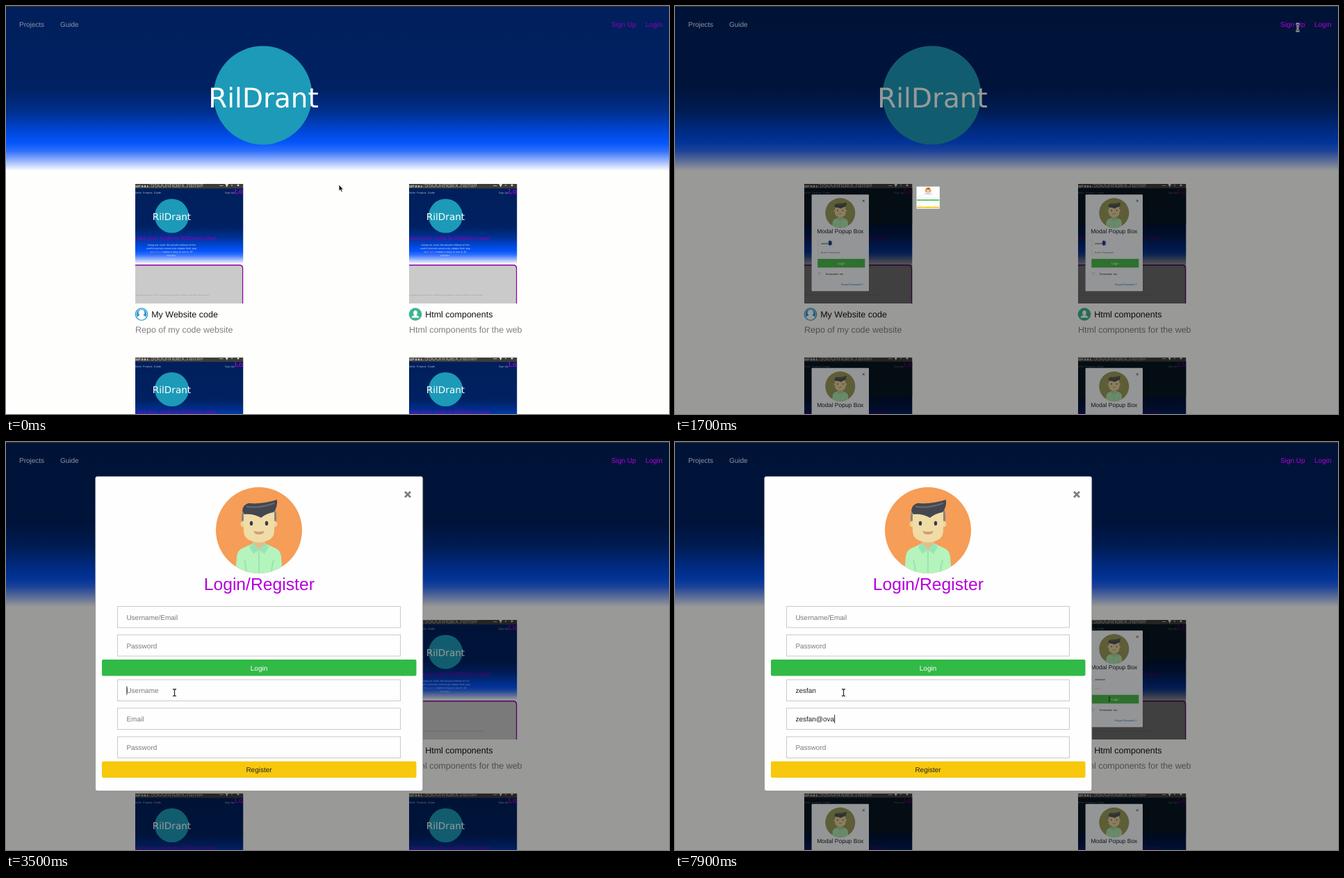
Write an HTML page that moves like this. It is 954 px wide and 587 px high and loops after 8 s.

```html
<!DOCTYPE html>
<html lang="en">
<head>
<meta charset="utf-8">
<title>Sign up form</title>
<style>
html, body { margin: 0; width: 100%; height: 100%; overflow: hidden; background: #fefefc; }
svg { display: block; width: 954px; height: 587px; }
text { font-family: "Liberation Sans", Arial, sans-serif; font-size: 10px; text-rendering: geometricPrecision; white-space: pre; }
.brand { font-family: "DejaVu Sans", sans-serif; fill: #fff; }
.mid { text-anchor: middle; }
.tiny { font-size: 3.8px; }
.title { font-size: 12.5px; fill: #111; }
.sub { font-size: 12.5px; fill: #808080; }
.field { fill: #fefefe; stroke: #c9c9c9; }
</style>
</head>
<body>
<svg viewBox="0 0 954 587" xmlns="http://www.w3.org/2000/svg">
  <defs>
    <linearGradient id="sky" x1="0" y1="0" x2="0" y2="1">
      <stop offset="0" stop-color="#001f5b"/>
      <stop offset=".5" stop-color="#002162"/>
      <stop offset=".64" stop-color="#002f8c"/>
      <stop offset=".76" stop-color="#0047d8"/>
      <stop offset=".83" stop-color="#0455fb"/>
      <stop offset=".88" stop-color="#2f70fb"/>
      <stop offset=".94" stop-color="#96b4fc"/>
      <stop offset="1" stop-color="#fefefc"/>
    </linearGradient>
    <clipPath id="round"><circle r="62"/></clipPath>
    <clipPath id="pane"><rect width="155.5" height="172"/></clipPath>

    <g id="man" clip-path="url(#round)">
      <path d="M-9 12H9V34H-9Z" fill="#e3bd8c"/>
      <path d="M-34 64L-32 38Q-31 28-22 25L-9 19L0 29L9 19L22 25Q31 28 32 38L34 64Z" fill="#b5f4bc"/>
      <path d="M-9 18L-14 24L-8 34L0 28L8 34L14 24L9 18L0 28Z" fill="#98e4b4"/>
      <path d="M0 29V64M-21 43Q-18 52-18 64M21 43Q18 52 18 64" fill="none" stroke="#98e4b4" stroke-width="2"/>
      <path d="M-25-13Q-26-28-19-32H22Q26-28 25-13Z" fill="#8b817b"/>
      <circle cx="-22" cy="-9" r="4.5" fill="#ecd39a"/>
      <circle cx="22" cy="-9" r="4.5" fill="#ecd39a"/>
      <path d="M-22-27H22V2Q21 12 12 15Q0 20-12 15Q-21 12-22 2Z" fill="#f0dca6"/>
      <path d="M-24-28Q-23-37-15-39Q4-37 26-44Q27-33 21-26Q10-24 3-18Q-8-24-21-23Z" fill="#44474f"/>
      <path d="M-18-34Q0-31 22-39" fill="none" stroke="#666a72" stroke-width="2"/>
      <ellipse cx="-11" cy="-10" rx="2.2" ry="3.2" fill="#3a3c44"/>
      <ellipse cx="11" cy="-10" rx="2.2" ry="3.2" fill="#3a3c44"/>
      <path d="M-7.5 1Q0 3 7.5 1Q7 6 0 6Q-7 6-7.5 1Z" fill="#d39b7a"/>
    </g>

    <g id="thumb" clip-path="url(#pane)">
      <rect width="155.5" height="172" fill="#fefefc"/>
      <rect y="6" width="155.5" height="109" fill="url(#sky)"/>
      <rect id="tint" y="6" width="155.5" height="51" fill="#122c30" opacity=".75"/>
      <rect width="155.5" height="6.5" fill="#3d3c39"/>
      <text y="4.8" font-size="5" fill="#aaa"><tspan font-weight="bold" font-size="4.6" fill="#fff">127.0.0.1</tspan>:5500/index.html#</text>
      <text x="121" y="4.6" font-size="5" fill="#ddd">– ▾ ◦  ▪  ×</text>
      <text y="14" class="tiny" fill="#aab4cc">Write  Projects  Guide</text>
      <text x="129" y="14" class="tiny" fill="#aab4cc">Sign Up</text>
      <text x="143" y="13.5" font-size="4" font-weight="bold" fill="#a000c8">Login</text>
      <circle cx="52.5" cy="46" r="24.5" fill="#1c9ab8"/>
      <text x="52.5" y="51.5" class="brand mid" style="font-size:13.6px">RilDrant</text>
      <text y="81" style="font-size:8.5px" fill="#8d00b4">oad your code to RilDrant now!</text>
      <g id="blurb" class="mid" fill="#c3d0ee"></g>
      <path d="M-3 116.8H149.5Q154.7 116.8 154.7 122V176H-3Z" fill="#cacaca" stroke="#8d00a8" stroke-width="1.5"/>
      <text y="160.5" style="font-size:3.4px" fill="#a2a2a2">ing and keep all of the code that you wish to share with the others here</text>
      <rect id="dim" y="6" width="155.5" height="166" opacity=".47"/>
      <g id="popup">
        <rect x="-41.2" y="-69.5" width="82.4" height="139" rx="1" fill="#f5f8fa"/>
        <g transform="translate(0 -43) scale(.347)">
          <circle r="62" fill="#9b9a5b"/>
          <use href="#man" opacity=".85"/>
        </g>
        <path d="M32-62l3 3m0-3l-3 3" stroke="#444" stroke-width=".9"/>
        <text y="-13.5" class="mid" style="font-size:8.5px" fill="#222">Modal Popup Box</text>
        <path d="M-32-5V5M-32 9V19" stroke="#ccd" stroke-width=".6"/>
        <text x="-28" y="2" class="tiny" fill="#333">unknown</text>
        <rect id="mark" x="-17" y="-2.5" width="5" height="5.5" fill="#2453b8"/>
        <text id="pass" x="-28" y="15.5" class="tiny" fill="#777"></text>
        <rect x="-32.5" y="23" width="68" height="12.5" fill="#4dbb4b"/>
        <text x="1.5" y="31" class="mid" style="font-size:4.6px" fill="#fff">Login</text>
        <rect x="-31" y="43" width="2.5" height="2.5" fill="#fff" stroke="#999" stroke-width=".4"/>
        <text x="-21" y="46" class="tiny" fill="#333">Remember me</text>
        <text x="1" y="61.5" class="tiny" fill="#2a6fd0">Forgot Password ?</text>
      </g>
      <path id="dot" d="M-1-3H1M0-3V3M-1 3H1" stroke="#222" stroke-width=".9"/>
    </g>
  </defs>

  <rect width="954" height="587" fill="#fefefc"/>
  <rect width="954" height="237" fill="url(#sky)"/>
  <circle cx="369.5" cy="128.5" r="71" fill="#1c9ab8"/>
  <text x="370.5" y="145.5" class="brand mid" style="font-size:39px">RilDrant</text>

  <use href="#thumb" x="186" y="256"/>
  <use href="#thumb" x="580" y="256"/>
  <use href="#thumb" x="186" y="505.5"/>
  <use href="#thumb" x="580" y="505.5"/>
  <g transform="translate(195 443.5)">
    <circle r="9.3" fill="#2797cb"/>
    <path d="M-6.4 4.6Q-5 1.6-2.4 1.4H2.4Q5 1.6 6.4 4.6A7.9 7.9 0 0 1-6.4 4.6Z" fill="#fff"/>
    <circle cy="-2.3" r="4.3" fill="#fff"/>
    <circle r="7.6" fill="none" stroke="#fff" stroke-width=".8"/>
  </g>
  <g transform="translate(589 443.5)">
    <circle r="9.3" fill="#3bb68f"/>
    <path d="M-5.6 5Q-5.4 2.4-1.5 1.4H1.5Q5.4 2.4 5.6 5Z" fill="#fff"/>
    <ellipse cy="-2" rx="2.8" ry="3.5" fill="#fff"/>
  </g>
  <text x="209.2" y="448" class="title">My Website code</text>
  <text x="186" y="469.5" class="sub">Repo of my code website</text>
  <text x="603.2" y="448" class="title">Html components</text>
  <text x="580" y="469.5" class="sub">Html components for the web</text>

  <rect id="shade" width="954" height="587" opacity=".4"/>
  <rect width="954" height="1.2" fill="#33332f"/>
  <g fill="#8b93a6">
    <text x="19" y="30">Projects</text>
    <text x="78" y="30">Guide</text>
  </g>
  <g id="links">
    <text x="871" y="30">Sign Up</text>
    <text x="920" y="30">Login</text>
  </g>

  <g id="modal">
    <rect x="128.5" y="49.5" width="471.3" height="452.5" rx="3" fill="#fefefe" stroke="#777" stroke-width=".6"/>
    <path d="M574 71.5l8 8m0-8l-8 8" stroke="#7d7d7d" stroke-width="2.8"/>
    <g transform="translate(364 127)">
      <circle r="62" fill="#f69d57"/>
      <use href="#man"/>
    </g>
    <text x="364.3" y="212.5" class="mid" style="font-size:24.7px" fill="#b400dc">Login/Register</text>
    <g id="fields"></g>
    <rect x="138" y="313" width="452.5" height="23.5" rx="2" fill="#31ba45"/>
    <text x="364" y="328.5" class="mid" fill="#fff">Login</text>
    <rect x="138" y="459.5" width="452.5" height="23.5" rx="2" fill="#f7c80c"/>
    <text x="364" y="475" class="mid" fill="#222">Register</text>
    <rect id="caret" width="1" height="12" fill="#222"/>
  </g>

  <path id="arrow" d="M0 0V9.2L2.1 7.4L3.7 10.8L5.3 10L3.8 6.9H6.6Z" fill="#111" stroke="#fff" stroke-width=".8"/>
  <g id="beam" fill="none">
    <path d="M-2.5-5H2.5M0-5V5M-2.5 5H2.5" stroke="#fff" stroke-width="2.6"/>
    <path d="M-2.5-5Q0-5 0-3.5Q0-5 2.5-5M0-4V4M-2.5 5Q0 5 0 3.5Q0 5 2.5 5" stroke="#333" stroke-width="1.3"/>
  </g>
</svg>

<script>
const LOOP = 8000, STEP = 100;
const ZOOM = 600, OPEN = 1650;
const THUMB_LOOP = 4800, THUMB_OPEN = 165, THUMB_CLOSE = 3300;

const $ = id => document.getElementById(id);
const show = (el, on) => el.setAttribute('display', on ? 'inline' : 'none');
const place = (el, x, y, s = 1) => el.setAttribute('transform', `translate(${x} ${y}) scale(${s})`);

// rows of [time, x, y]
const mouse = [[200, 479, 257], [700, 841, 61], [1000, 841, 61], [1200, 873, 44],
  [1400, 896, 31], [1700, 896, 31], [2100, 559, 173], [2600, 242.5, 360.5]];
const thumbMouse = [[0, 148, 14], [600, 55, 68], [900, 55, 68], [1300, 37, 85],
  [1900, 37, 85], [2200, 34, 99], [2700, 45, 114]];

// the time of each key press
const userKeys = [4450, 4700, 4950, 5200, 5400, 5650];
const mailKeys = [6300, 6450, 6550, 6650, 6750, 6850, 7100, 7500, 7700, 7850];
const FOCUS = 2900, TAB = 6100;

$('blurb').innerHTML = ['Using our vault, the private release of the',
  'useful internet community adapts their app', 'or <tspan fill="#d06a9c">project</tspan> makes it easy to use in 10', 'minutes.']
  .map((s, i) => `<text x="52" y="${88.5 + i * 5.2}" class="tiny">${s}</text>`).join('');

const tops = [236.5, 277.5, 342, 383, 424];
$('fields').innerHTML = ['Username/Email', 'Password', 'Username', 'Email', 'Password']
  .map((s, i) => `<rect x="160.5" y="${tops[i]}" width="407" height="30.5" class="field"/>
    <text x="173.4" y="${tops[i] + 19}" fill="#7b7b7b">${s}</text>`).join('');
const labels = $('fields').querySelectorAll('text');

function along(rows, t) {
  let i = rows.findIndex(r => r[0] > t);
  if (i === 0) return rows[0].slice(1);
  if (i < 0) return rows[rows.length - 1].slice(1);
  const [t0, x0, y0] = rows[i - 1], [t1, x1, y1] = rows[i];
  const k = (t - t0) / (t1 - t0);
  return [x0 + (x1 - x0) * k, y0 + (y1 - y0) * k];
}

// the CSS "ease" curve, cubic-bezier(.25, .1, .25, 1)
function ease(x) {
  if (x <= 0) return 0;
  if (x >= 1) return 1;
  const curve = (a, b, u) => 3 * a * u * (1 - u) ** 2 + 3 * b * u * u * (1 - u) + u ** 3;
  let lo = 0, hi = 1;
  for (let i = 0; i < 24; i++) {
    const u = (lo + hi) / 2;
    if (curve(.25, .25, u) < x) lo = u; else hi = u;
  }
  return curve(.1, 1, lo);
}

function type(label, text, keys, hint, t) {
  const n = keys.filter(k => k <= t).length;
  label.textContent = n ? text.slice(0, n) : hint;
  label.setAttribute('fill', n ? '#222' : '#7b7b7b');
  return n ? label.getComputedTextLength() : 0;
}

function drawThumb(t) {
  const p = (t - THUMB_OPEN + THUMB_LOOP) % THUMB_LOOP;
  const open = p < THUMB_CLOSE;
  for (const id of ['tint', 'dim', 'popup', 'dot']) show($(id), open);
  place($('popup'), 51.8, 84.8, ease(p / ZOOM));
  show($('mark'), p >= 1300 && p < 2200);
  $('pass').textContent = p < 2300 ? 'Enter Password' : '––––';
  place($('dot'), ...along(thumbMouse, p));
}

function drawModal(t) {
  const open = t >= OPEN, s = ease((t - OPEN) / ZOOM);
  show($('shade'), open);
  show($('modal'), open);
  $('links').setAttribute('fill', open ? '#b000dc' : '#8c00b4');
  place($('modal'), 364.2 * (1 - s), 275.75 * (1 - s), s);
  if (!open) return;
  const userEnd = type(labels[2], 'zesfan', userKeys, 'Username', t);
  const mailEnd = type(labels[3], 'zesfan@ova', mailKeys, 'Email', t);
  show($('caret'), t >= FOCUS);
  place($('caret'), 173.4 + (t < TAB ? userEnd : mailEnd), tops[t < TAB ? 2 : 3] + 9.5);
}

function drawMouse(t) {
  const beam = t >= 2600 || (t >= 1400 && t < 1800);
  const at = along(mouse, t);
  show($('beam'), beam);
  show($('arrow'), !beam);
  place($('beam'), ...at);
  place($('arrow'), ...at);
}

const start = performance.now();
let last = -1;
function frame() {
  const t = Math.floor((performance.now() - start) % LOOP / STEP) * STEP;
  if (t !== last) {
    last = t;
    drawThumb(t);
    drawModal(t);
    drawMouse(t);
  }
  requestAnimationFrame(frame);
}
frame();
</script>
</body>
</html>
```
